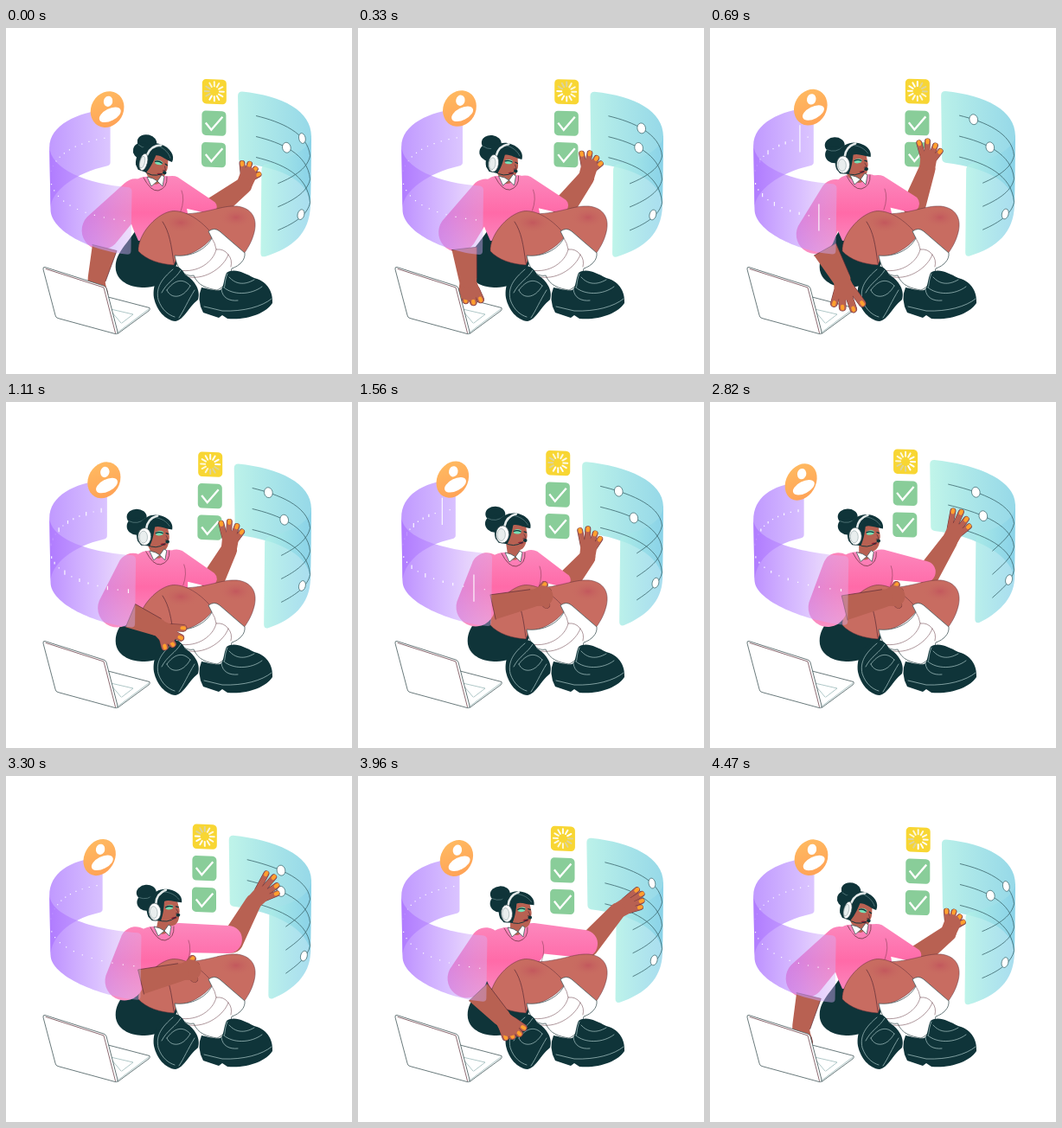
These frames come from a looping animation (400x400 px, 4500 ms). An HTML page:

```html
<!DOCTYPE html>
<html lang="en">
<head>
<meta charset="utf-8">
<title>Assistant at work</title>
<style>
html, body { margin: 0; width: 100%; height: 100%; overflow: hidden; background: #fff; }
svg { display: block; width: 100vw; height: 100vh; }
.line { fill: none; stroke: #5b2c36; stroke-width: .7; stroke-linecap: round; }
.seam { fill: none; stroke: #9bb9b9; stroke-width: .8; stroke-linecap: round; }
.wire { fill: #fff; stroke: #44585b; stroke-width: .8; stroke-linejoin: round; }
.dark { fill: #0f3439; }
.skin { fill: #b86152; }
.leg { fill: #c86c61; stroke: #5b2c36; stroke-width: .5; }
.knit { fill: url(#knit); }
.white { fill: #fff; }
</style>
</head>
<body>
<svg viewBox="0 0 400 400">
  <defs>
    <linearGradient id="knit" gradientUnits="userSpaceOnUse" x1="0" y1="170" x2="0" y2="258">
      <stop offset="0" stop-color="#fc88bd"/><stop offset=".5" stop-color="#ff6aa8"/><stop offset="1" stop-color="#f98fc4"/>
    </linearGradient>
    <linearGradient id="violetBack" gradientUnits="userSpaceOnUse" x1="50" y1="0" x2="122" y2="0">
      <stop offset="0" stop-color="#b587ff" stop-opacity=".85"/><stop offset="1" stop-color="#d6bdff" stop-opacity=".85"/>
    </linearGradient>
    <linearGradient id="violetFront" gradientUnits="userSpaceOnUse" x1="50" y1="0" x2="158" y2="0">
      <stop offset="0" stop-color="#ac74ff" stop-opacity=".8"/><stop offset=".5" stop-color="#c094ff" stop-opacity=".6"/><stop offset="1" stop-color="#dcb8f4" stop-opacity=".36"/>
    </linearGradient>
    <linearGradient id="tealBack" gradientUnits="userSpaceOnUse" x1="255" y1="0" x2="353" y2="0">
      <stop offset="0" stop-color="#bdf4e8" stop-opacity=".95"/><stop offset="1" stop-color="#84d2e4" stop-opacity=".85"/>
    </linearGradient>
    <linearGradient id="tealFront" gradientUnits="userSpaceOnUse" x1="294" y1="0" x2="353" y2="0">
      <stop offset="0" stop-color="#b4f3e6" stop-opacity=".85"/><stop offset="1" stop-color="#84cfe8" stop-opacity=".7"/>
    </linearGradient>
    <linearGradient id="amber" x1="0" y1="0" x2="1" y2="1">
      <stop offset="0" stop-color="#ffbd62"/><stop offset="1" stop-color="#ff9f55"/>
    </linearGradient>
    <radialGradient id="blush">
      <stop offset="0" stop-color="#bf4a5a" stop-opacity=".6"/><stop offset="1" stop-color="#c86c61" stop-opacity="0"/>
    </radialGradient>
  </defs>
  <g id="behind"></g>
  <path class="dark" d="M152 230C143 248 124 260 127 280C130 295 146 300 160 300C182 300 192 285 198 272L196 240Z"/>
  <g id="upper"></g>
  <g id="legs">
    <path class="leg" d="M205 215C235 214 248 205 267 206C284 208 291 220 287 236C284 248 279 255 275 261L234 238Z"/>
    <ellipse cx="266" cy="219" rx="20" ry="12" fill="url(#blush)"/>
    <path class="leg" d="M153 258C152 240 172 216 190 212C206 209 226 222 240 240C228 256 212 263 198 265L194 274C178 273 162 268 153 258Z"/>
    <ellipse cx="202" cy="225" rx="22" ry="12" fill="url(#blush)"/>
    <path class="line" d="M181 224C189 236 191 250 194 272"/>
    <path class="wire" d="M234 235Q241 230 247 235Q262 248 276 260C277 268 270 275 261 278C259 290 252 300 244 303C232 301 222 298 217 286C207 288 198 280 195 263C214 265 231 256 238 243Z"/>
    <path class="line" stroke-opacity=".7" d="M200 280C222 284 240 270 243 256M212 288C232 291 252 276 257 262M238 243Q242 249 243 256Q252 255 257 262Q262 268 260 276"/>
    <path class="dark" d="M190 276C176 282 169 296 171 312C174 326 184 338 196 339C206 337 210 324 222 314C226 302 216 290 207 285C203 277 196 273 190 276Z"/>
    <path class="seam" d="M193 279C180 290 173 300 176 314C180 326 188 332 195 334M186 303C194 292 204 288 213 298M186 303C190 313 204 314 213 298M202 280C196 290 186 294 180 306M218 303C210 316 206 326 200 335"/>
    <path class="dark" d="M255 283C264 277 275 283 287 289C300 292 309 303 308 318C300 330 279 338 256 336L250 332L246 335L228 329Q220 314 226 300C236 302 246 305 249 302C252 298 252 289 255 283Z"/>
    <path class="seam" d="M229 322L250 327C275 328 296 322 307 313M252 300C262 309 283 309 296 299M258 288C265 296 275 298 287 291M249 302C250 312 258 316 268 315M256 284C252 294 254 298 252 300"/>
  </g>
  <path class="wire" d="M118 311L166 323.500Q167 325 165 327L129 353.500Z"/>
  <path class="seam" stroke="#44585b" d="M121 325L147 331L134 341M129 352L165 325M122 328L133 341"/>
  <g id="near"></g>
  <path class="wire" d="M45 276.500L113 298Q115.500 299 116 301L129 351Q129 354.500 126 353.500L60 335.500Q57.500 335 57 332L43 279Q42.500 276 45 276.500Z"/>
  <path class="line" stroke="#44585b" d="M46 278.500L113 300L126.500 352.500"/>
  <g id="front"></g>
</svg>
<script>
const LOOP = 4500, STEP = 30;
const TIMES = [0, 690, 1560, 2250, 3300, 3960];

// One value per entry of TIMES; the last eases back into the first.
const POSE = {
  collarX: [173, 172, 180, 177, 181, 183], collarY: [178, 176, 180, 179, 180, 181],
  earX: [159, 154, 167, 163, 172, 172], earY: [155, 158, 153, 153, 157, 159],
  tilt: [14, -2, 2, 3, -5, -3], earR: [4.5, 7.5, 7.5, 7.5, 7, 6.5],
  // arm by the laptop
  aShX: [150, 145, 149, 146, 150, 148], aShY: [192, 193, 192, 192, 192, 193],
  aPuffX: [110, 122, 136, 135, 137, 126], aPuffY: [234, 239, 237, 238, 237, 234],
  aCuffX: [114, 133, 156, 155, 156, 139], aCuffY: [254, 256, 237, 238, 238, 250],
  aHandX: [105, 152, 201, 201, 201, 166], aHandY: [290, 290, 227, 227, 227, 279],
  aAng: [92, 76, -12, -12, -12, 50], aLen: [8, 25, 9, 9, 9, 16], aSpread: [12, 17, 32, 32, 32, 12],
  // arm by the sliders
  bShX: [192, 194, 200, 196, 200, 202], bShY: [188, 187, 188, 188, 187, 187],
  bCuffX: [236, 232, 238, 237, 257, 261], bCuffY: [207, 203, 206, 206, 189, 194],
  bCuffR: [8, 10, 8, 8, 16, 16],
  bHandX: [275, 251, 265, 265, 286, 300], bHandY: [182, 163, 180, 180, 146, 156],
  bAng: [-67, -82, -82, -84, -45, -30], bLen: [14, 20, 21, 22, 25, 22], bSpread: [22, 18, 15, 14, 13, 8],
  slide: [.7, .19, .23, .22, .42, .67]
};

const layer = id => document.getElementById(id);
const clamp = v => Math.max(0, Math.min(1, v));
const ease = v => v * v * (3 - 2 * v);
const ramp = (t, a, b) => ease(clamp((t - a) / (b - a)));
const wave = (t, peak) => Math.cos(2 * Math.PI * (t - peak) / LOOP);
const n = v => Math.round(v * 100) / 100;
const path = (d, attrs) => `<path d="${d}" ${attrs}/>`;
const oval = (x, y, rx, ry, attrs) => `<ellipse cx="${n(x)}" cy="${n(y)}" rx="${n(rx)}" ry="${n(ry)}" ${attrs}/>`;

function poseAt(t) {
  let i = TIMES.length - 1;
  while (TIMES[i] > t) i--;
  const j = (i + 1) % TIMES.length;
  const k = ease((t - TIMES[i]) / ((TIMES[j] || LOOP) - TIMES[i]));
  const p = {};
  for (const key in POSE) p[key] = POSE[key][i] + (POSE[key][j] - POSE[key][i]) * k;
  return p;
}

function bezier(p, s) {
  const r = 1 - s, w = [r * r * r, 3 * r * r * s, 3 * r * s * s, s * s * s];
  return [0, 1].map(a => p.reduce((sum, q, i) => sum + q[a] * w[i], 0));
}
const curve = p => `M${p[0].map(n)}C${p.slice(1).map(q => q.map(n).join(' ')).join(' ')}`;

// Tapered limb; flat leaves the first end cut straight.
function limb(x1, y1, r1, x2, y2, r2, flat) {
  const a = Math.atan2(y2 - y1, x2 - x1), nx = -Math.sin(a), ny = Math.cos(a);
  const at = (x, y, r) => `${n(x + nx * r)} ${n(y + ny * r)}`;
  const arc = r => `A${n(r)} ${n(r)} 0 0 1 `;
  return `M${at(x1, y1, r1)}${flat ? 'L' : arc(r1)}${at(x1, y1, -r1)}L${at(x2, y2, -r2)}${arc(r2)}${at(x2, y2, r2)}`;
}

function hand(x, y, ang, len, spread, palm) {
  const rad = Math.PI / 180, ux = Math.cos(ang * rad), uy = Math.sin(ang * rad);
  const px = x + 13 * ux, py = y + 13 * uy;
  let out = '';
  [1, 1.1, .92, .7].forEach((f, i) => {
    const a = (ang + (i - 1.3) * spread) * rad, c = Math.cos(a), s = Math.sin(a);
    const side = (i - 1.5) * palm * .46, bx = px - uy * side, by = py + ux * side;
    const d = (u, v) => `M${n(bx + c * u)} ${n(by + s * u)}L${n(bx + c * v)} ${n(by + s * v)}`;
    const end = len * f - 3;
    const stroke = (w, col) => `fill="none" stroke-linecap="round" stroke-width="${n(w)}" stroke="${col}"`;
    out += path(d(0, end), stroke(palm * .72, '#6b333a')) + path(d(-3, end), stroke(palm * .72 - 1, '#b86152'));
    if (len > 12 || !i) out += path(d(end - 1.5, end + 1), stroke(4.2, '#ffa02e'));
  });
  return out + path(limb(x, y, 9, px, py, palm), 'class="skin"');
}

function forearm(x, y, r, hx, hy, wrist, flat) {
  const d = limb(x, y, r, hx, hy, wrist, flat);
  return path(d + 'Z', 'class="skin"') +
    (flat ? path(d.replace(/A.*$/, ''), 'class="line"') : '');
}

// Geometry of both curved screens
function screens(t) {
  const u = wave(t, 250), w = wave(t, 3900);
  return {
    u, w,
    v: { bx: 114.5 + 6.5 * u, bt: 92.5 + 2.7 * w, bb: 157.5 + u, fx: 153 - 8 * u, ft: 180.5 + 2 * u + 4 * w, fb: 259.7 + 2.3 * u },
    g: { bx: 261 + 7.5 * u, bt: 70.2 + 3.5 * u, bb: 151.5 + 4 * u, fx: 300.5 - 6.5 * u, ft: 157 + 3 * u, fb: 259.5 + 5 * u }
  };
}

function violetBack({ bx, bt, bb }) {
  return path(`M${bx - 4} ${bt}Q${bx} ${bt} ${bx} ${bt + 4}L${bx} ${bb - 3}Q${bx} ${bb} ${bx - 4} ${bb + 1}
    C${bx - 40} ${bb + 9} 52 ${bb + 30} 51.5 208L50.2 ${bt + 44}C50.2 ${bt + 18} ${bx - 38} ${bt + 3} ${bx - 4} ${bt}Z`, 'fill="url(#violetBack)"');
}

function violetFront({ bt, fx, ft, fb }) {
  return path(`M50.2 ${bt + 42}C50.2 ${bt + 69} ${fx - 50} ${ft - 4} ${fx - 4} ${ft - 1}Q${fx} ${ft} ${fx} ${ft + 4}L${fx - 1} ${fb - 4}
    Q${fx - 1} ${fb} ${fx - 5} ${fb}C${fx - 47} ${fb - 4} 51.5 ${fb - 27} 51.5 ${fb - 52}Z`, 'fill="url(#violetFront)"');
}

function voice(p, t) {
  const on = ramp(t, 450, 650) * (1 - ramp(t, 2500, 2900)), full = ramp(t, 1600, 2200);
  let d = '';
  for (let k = 0; k < 11; k++) {
    const [x, y] = bezier(p, .06 + k * .085);
    const peak = k === 1 ? 30 - 12 * full : 4 + 14 * full;
    const h = 1.2 + on * peak * Math.pow(Math.sin(t / 277 + 1.3 * (k - 1) - .92), 4);
    d += `M${n(x)} ${n(y - h / 2)}v${n(h)}`;
  }
  return path(d, 'stroke="#fff" stroke-width="1.2" stroke-opacity=".9"');
}

const voiceBack = ({ bx, bt, bb }, t) => {
  const m = (bt + bb) / 2;
  return voice([[bx, m], [bx - 38, m + 5], [53, m + 20], [51, 172]], t);
};
const voiceFront = ({ fx, ft, fb }, t) => {
  const m = (ft + fb) / 2;
  return voice([[fx, m], [fx - 48, m - 4], [53, m - 18], [51, 172]], t);
};

function avatar(u, w) {
  const x = 111 + 6.5 * u, y = 92.3 + 2.7 * w;
  return `<g transform="translate(${n(x)} ${n(y)})">` +
    oval(0, 0, 17.8 + .9 * u, 22 - .5 * u, 'fill="url(#amber)" transform="rotate(30)"') +
    oval(-1, -9.300, 5.2, 6.2, 'class="white" transform="rotate(12)"') +
    oval(0, 7, 13.5, 7, 'class="white" transform="rotate(-27)"') + '</g>';
}

function teal({ bx, bt, bb, fx, ft, fb }, u, slide) {
  let out = path(`M${bx} ${bt + 5}Q${bx} ${bt} ${bx + 5} ${bt}C${bx + 52} ${bt + 5} 353 ${bt + 22} 353 ${bt + 52}L352 207
    C352 178 ${bx + 54} ${bb + 7} ${bx + 5} ${bb + 1}Q${bx + 1} ${bb} ${bx + 1} ${bb - 4}Z`, 'fill="url(#tealBack)"');
  out += path(`M353 ${bt + 50}C353 138 332 ${ft - 9} ${fx + 5} ${ft - 2}Q${fx + 1} ${ft} ${fx + 1} ${ft + 4}L${fx} ${fb - 4}
    Q${fx} ${fb + 1} ${fx + 5} ${fb}C332 ${fb - 10} 351 ${fb - 27} 352 205Z`, 'fill="url(#tealFront)"');
  const knobs = [];
  for (let i = 0; i < 3; i++) {
    const y = bt + 28 + 24 * i, end = 144 + 27 * i + 4 * u;
    const back = [[bx + 21, y], [bx + 50, y + 7], [349, y + 20], [351.5, end]];
    const near = [[351.5, end], [349, end + 13], [336, end + 23], [fx + 20, end + 32]];
    out += path(curve(back) + curve(near), 'fill="none" stroke="#3b666c" stroke-width=".8"');
    knobs.push(i < 2 ? bezier(back, i ? .42 : slide) : [343.3 - 2.5 * u, 210.5 + 5.5 * u]);
  }
  knobs.forEach(([x, y], i) => {
    const r = i < 2 && x < 335 ? 4.8 : 3.8;
    out += oval(x, y, r, 6, `fill="#fff" stroke="#3b666c" stroke-width=".7" transform="rotate(${i < 2 ? -12 : 15} ${n(x)} ${n(y)})"`);
  });
  return out;
}

function tiles(u, t) {
  let out = `<g transform="translate(${n(233.3 + 8 * u)} ${n(71 + 2.5 * u)}) skewY(2)">`;
  ['#f8d633', '#89cd99', '#89cd99'].forEach((col, i) => {
    out += `<rect x="${-14 - .4 * i}" y="${36.5 * i - 14}" width="28" height="28.500" rx="4.5" fill="${col}"/>`;
    if (i) out += path(`M-10 ${36.5 * i}L-3.500 ${36.5 * i + 8}L9.500 ${36.5 * i - 7.5}`, 'fill="none" stroke="#fff" stroke-width="2.300"');
  });
  const turn = Math.floor(t / 125);
  for (let j = 0; j < 12; j++) {
    const dim = j < 3 ? '#d3d2c4' : '#fff';
    out += path('M6 0H11', `stroke="${dim}" stroke-width="2" stroke-linecap="round" opacity="${n(.7 + j * .027)}" transform="rotate(${150 + 30 * (j + turn)})"`);
  }
  return out + '</g>';
}

function head(p) {
  const turn = (7.5 - p.earR) * 2.5;
  const line = (d, col, w) => path(d, `fill="none" stroke="${col}" stroke-width="${w}" stroke-linecap="round"`);
  return path(limb(p.earX + 12, p.earY + 9, 8, p.collarX, p.collarY - 4, 7), 'class="skin"') +
    `<g transform="translate(${n(p.earX)} ${n(p.earY)}) rotate(${n(p.tilt)})">` +
    oval(-9 + turn, -23, 11.5, 9, 'class="dark"') + oval(-9 + turn * .7, -12, 11.5, 10, 'class="dark"') +
    line(`M${n(-18 + turn)} -18Q${n(-8 + turn)} -13 ${n(1 + turn)} -21`, '#6f9294', .6) +
    path('M6 -13L27 -12C27 -5 30 0 28 4C28 12 24 18 18 18C11 18 7 14 4 8Z', 'class="skin"') +
    path('M13 -5Q18 -8 22 -5L21 -2Q16 0 13 -2Z', 'fill="#77dfb4"') +
    line('M13 -4Q17 -6 21 -4M25 -4L27.500 -3', '#0f3439', 1.3) +
    line('M25 -1L27 3L24 4', '#5b2c36', .7) +
    path('M18 9Q22 6.500 25 9Q22 12 18 9Z', 'fill="#8d1f35"') +
    path('M-8 5C-13 -12 0 -26 14 -25C26 -24 34 -16 32 -8C24 -9 17 -13 12 -11C11 -5 10 3 6 11L-4 10Z', 'class="dark"') +
    line('M2 -9C3 -17 8 -22 15 -24', '#e4eaea', 2.6) +
    line('M13 -22C20 -21 26 -17 29 -12', '#6f9294', .6) +
    line('M2 9Q13 16 24 8', '#0f3439', .9) + oval(26.5, 6, 2.3, 2, 'class="dark"') +
    oval(0, 0, p.earR, 10, 'fill="#fff" stroke="#44585b" stroke-width=".7"') +
    oval(-1.300, .5, p.earR * .62, 7, 'fill="#e9eeee" stroke="#7c9193" stroke-width=".5"') + '</g>';
}

function torso(p) {
  const x = p.collarX, y = p.collarY;
  return path(`M${x - 13} ${y - 6}C${x - 28} ${y - 4} 141 188 142 212C143 226 149 236 153 246L218 240L210 214
    C${x + 35} ${y + 24} ${x + 34} ${y + 15} ${x + 30} ${y + 8}C${x + 27} ${y} ${x + 22} ${y - 6} ${x + 12} ${y - 7}Z`, 'class="knit"') +
    path(`M${x + 30} ${y + 10}Q${x + 34} ${y + 20} ${x + 29} ${y + 34}`, 'class="line" stroke-opacity=".6"') +
    path(`M${x - 14} ${y - 5}Q${x - 6} ${y + 11} ${x + 3} ${y + 10}Q${x + 14} ${y + 7} ${x + 13} ${y - 6}`, 'class="line"');
}

function collar(p) {
  const x = p.collarX, y = p.collarY;
  return path(`M${x - 10} ${y - 6}L${x - 3} ${y - 4}L${x + 2} ${y - 1}L${x + 7} ${y - 8}L${x + 10} ${y - 6}L${x + 8} ${y + 5}L${x + 2} ${y - 1}L${x - 5} ${y + 5}Z`, 'class="wire"');
}

function draw(now) {
  const t = Math.floor(now % LOOP / STEP) * STEP;
  const p = poseAt(t), { u, w, v, g } = screens(t);

  layer('behind').innerHTML = violetBack(v) + voiceBack(v, t) + avatar(u, w) + teal(g, u, p.slide) + tiles(u, t);

  layer('upper').innerHTML =
    hand(p.bHandX, p.bHandY, p.bAng, p.bLen, p.bSpread, 9.5) +
    forearm(p.bCuffX + 4, p.bCuffY + 2, 13.5, p.bHandX, p.bHandY, 9.5) +
    path(limb(p.bShX, p.bShY, 17, p.bCuffX, p.bCuffY, p.bCuffR) + 'Z', 'class="knit"') +
    torso(p) + head(p) + collar(p);

  layer('near').innerHTML =
    path(limb(p.aShX, p.aShY, 18, p.aPuffX, p.aPuffY, 22.5), 'class="knit"') +
    hand(p.aHandX, p.aHandY, p.aAng, p.aLen, p.aSpread, 12) +
    forearm(p.aCuffX, p.aCuffY, 14.5, p.aHandX, p.aHandY, 10.5, true);

  layer('front').innerHTML = violetFront(v) + voiceFront(v, t);
  requestAnimationFrame(draw);
}
draw(performance.now());
</script>
</body>
</html>
```
